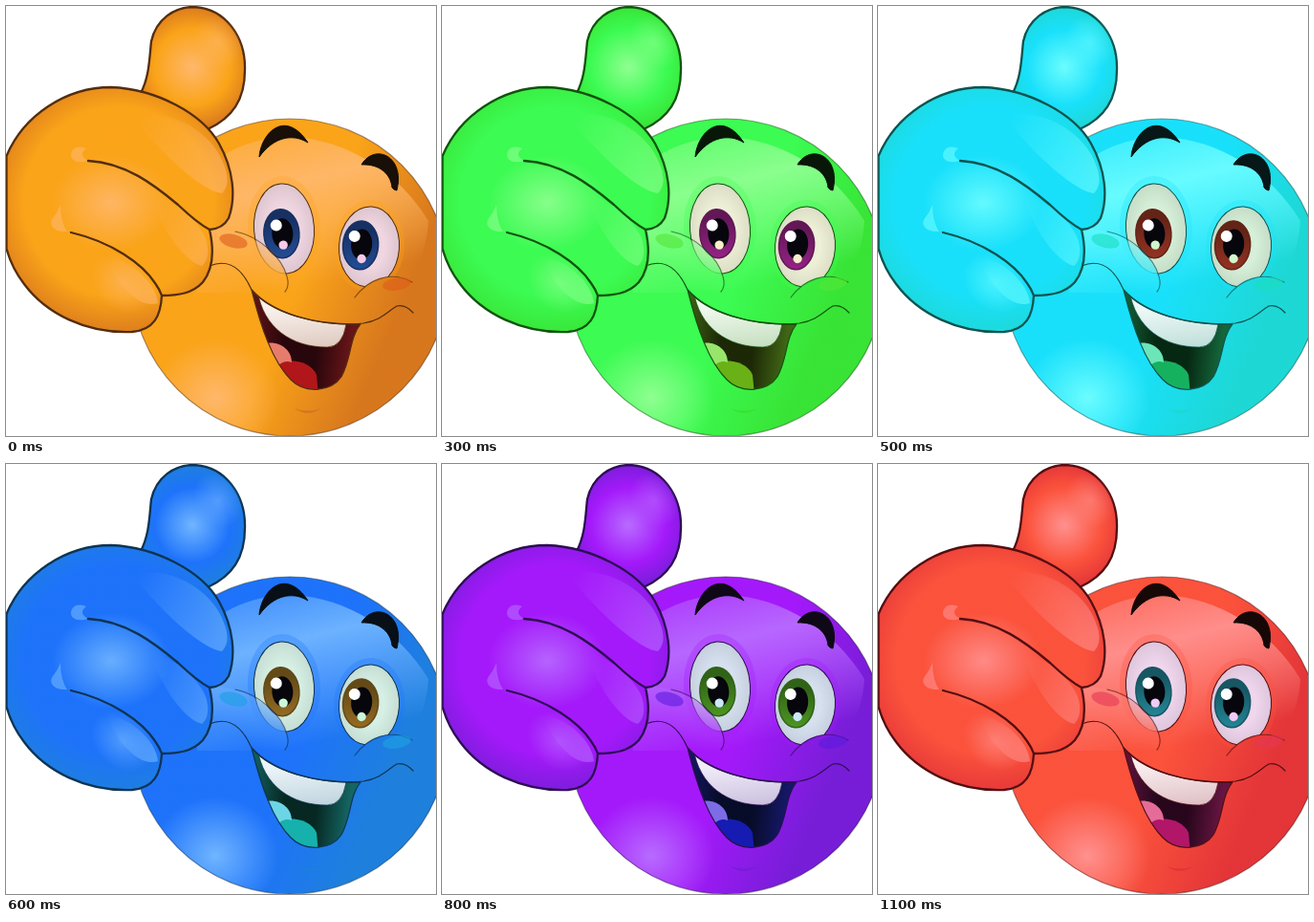
Write an HTML page that moves like this. It is 450 px wide and 450 px high and loops after 1.2 s.

```html
<!DOCTYPE html>
<html lang="en">
<head>
<meta charset="utf-8">
<title>Thumbs up</title>
<style>
  html, body { margin: 0; width: 100%; height: 100%; overflow: hidden; background: #fff; }
  svg { display: block; width: 100%; height: 100%; }
  .skin { stop-color: var(--skin); }
  .glow { stop-color: var(--glow); }
  .shade { stop-color: var(--shade); }
  .clear { stop-opacity: 0; }
  .line { fill: none; stroke: var(--line); stroke-width: 2.3; stroke-linecap: round; stroke-linejoin: round; }
  .thin { stroke-width: 1.2; }
  .white { fill: url(#eye); stroke: var(--line); stroke-width: 1; }
  .lid { fill: var(--skin); opacity: .3; }
  .iris { fill: url(#iris); stroke: var(--irisRim); stroke-width: 1.5; }
  .pupil { fill: #06060c; }
  .spark { fill: var(--spark); }
  .spot { fill: url(#spot); }
  .blush { fill: var(--blush); opacity: .6; }
  .brow { fill: var(--brow); stroke: var(--brow); stroke-linejoin: round; }
</style>
</head>
<body>
<svg id="stage" viewBox="0 0 450 450">
  <defs>
    <linearGradient id="face" gradientUnits="userSpaceOnUse" x1="245" y1="260" x2="425" y2="335">
      <stop class="skin" offset="0"/><stop class="skin" offset=".35"/><stop class="shade" offset=".9"/>
    </linearGradient>
    <linearGradient id="forehead" gradientUnits="userSpaceOnUse" x1="288" y1="140" x2="326" y2="292">
      <stop class="glow" offset="0" stop-opacity=".55"/><stop class="glow" offset=".3" stop-opacity=".95"/>
      <stop class="glow clear" offset="1"/>
    </linearGradient>
    <radialGradient id="hand" gradientUnits="userSpaceOnUse" cx="118" cy="205" r="150">
      <stop class="skin" offset="0"/><stop class="skin" offset=".66"/><stop class="shade" offset=".96"/>
    </radialGradient>
    <radialGradient id="thumb" gradientUnits="userSpaceOnUse" cx="195" cy="64" r="66">
      <stop class="glow" offset="0"/><stop class="skin" offset=".6"/><stop class="shade" offset="1"/>
    </radialGradient>
    <radialGradient id="spot">
      <stop class="glow" offset="0"/><stop class="glow clear" offset="1"/>
    </radialGradient>
    <linearGradient id="tip" x1="1" y1=".7" x2="0" y2=".2">
      <stop class="glow" offset="0"/><stop class="glow clear" offset="1"/>
    </linearGradient>
    <linearGradient id="cheek" x1=".5" y1="0" x2=".4" y2="1">
      <stop class="glow" offset="0" stop-opacity=".35"/><stop class="skin" offset=".7"/>
    </linearGradient>
    <radialGradient id="eye">
      <stop offset=".5" stop-color="var(--white)"/><stop offset="1" stop-color="var(--eyeEdge)"/>
    </radialGradient>
    <linearGradient id="iris" x1="0" y1="0" x2="0" y2="1">
      <stop offset=".2" stop-color="var(--irisRim)"/><stop offset="1" stop-color="var(--iris)"/>
    </linearGradient>
    <linearGradient id="maw" x1="0" y1="0" x2="1" y2=".1">
      <stop offset="0" stop-color="var(--mawSide)"/><stop offset=".35" stop-color="var(--maw)"/>
      <stop offset=".65" stop-color="var(--maw)"/><stop offset=".95" stop-color="var(--mawSide)"/>
    </linearGradient>
    <linearGradient id="teeth" x1=".3" y1="0" x2=".5" y2="1">
      <stop offset=".3" stop-color="var(--teeth)"/><stop offset="1" stop-color="var(--teethEdge)"/>
    </linearGradient>
    <clipPath id="inFace"><circle cx="297" cy="284" r="166"/></clipPath>
    <clipPath id="inMouth"><path id="mouth" d="M257 297C277 321 322 334 371 333C359 348 362 368 351 388C341 403 314 407 298 391C279 372 267 337 257 297Z"/></clipPath>
  </defs>

  <g id="head">
    <circle cx="297" cy="284" r="166" fill="url(#face)"/>
    <g clip-path="url(#inFace)">
      <path d="M195 182C225 150 262 137 300 137C355 140 410 172 442 225C440 262 425 285 400 300H200Z" fill="url(#forehead)"/>
      <ellipse class="spot" cx="219" cy="410" rx="66" ry="62"/>
    </g>
    <circle class="line thin" cx="297" cy="284" r="166" opacity=".5"/>

    <g id="leftEye" transform="rotate(-4 291 233)">
      <ellipse class="lid" cx="291" cy="232" rx="38" ry="54"/>
      <ellipse class="white" cx="291" cy="233" rx="31.5" ry="47"/>
      <ellipse class="iris" cx="288" cy="238" rx="18.5" ry="25.5"/>
      <ellipse class="pupil" cx="289" cy="238" rx="11" ry="16"/>
      <circle cx="283" cy="229" r="6" fill="#fff"/>
      <circle class="spark" cx="289" cy="250" r="4.7"/>
    </g>
    <g id="rightEye" transform="rotate(4 380 252)">
      <ellipse class="lid" cx="380" cy="251" rx="37" ry="48"/>
      <ellipse class="white" cx="380" cy="252" rx="31.5" ry="42"/>
      <ellipse class="iris" cx="371" cy="251" rx="18.5" ry="25.5"/>
      <ellipse class="pupil" cx="372" cy="250" rx="11" ry="16"/>
      <circle cx="364" cy="242" r="6" fill="#fff"/>
      <circle class="spark" cx="373" cy="265" r="4.7"/>
    </g>

    <path d="M208 234C245 229 284 253 294 283Q297 294 292 300L300 325L258 297C252 280 238 265 214 272Z" fill="url(#cheek)"/>
    <path d="M365 305C378 286 402 275 427 290C430 302 425 310 405 314L380 331L360 330Z" fill="url(#face)"/>
    <path class="line thin" d="M240 236C266 241 289 264 294 283Q297 293 292 299M365 305C378 287 402 276 425 289" opacity=".65"/>
    <ellipse class="blush" cx="238" cy="246" rx="15" ry="7" transform="rotate(14 238 246)"/>
    <ellipse class="blush" cx="409" cy="291" rx="15" ry="6.5" transform="rotate(-10 409 291)"/>

    <use href="#mouth" fill="url(#maw)"/>
    <g clip-path="url(#inMouth)">
      <path d="M280 376C293 367 319 371 325 386L327 407H285Z" fill="var(--tongue)"/>
      <path d="M269 354C283 349 299 358 299 373C291 370 286 375 281 380Z" fill="var(--tongueTop)"/>
      <path d="M263 297C269 337 299 357 336 357Q352 357 356 333L371 326Z" fill="url(#teeth)" stroke="var(--line)" stroke-width=".7"/>
    </g>
    <use href="#mouth" class="line thin"/>
    <path class="line thin" d="M213 272C235 263 248 277 257 297C283 325 333 336 374 332C393 329 400 319 409 314Q418 312 426 321"/>
    <path d="M302 421Q316 426 330 421Q316 431 302 421" fill="var(--shade)"/>

    <path class="brow" d="M265 158C267 133 292 107 316 143C300 133 280 137 265 158Z"/>
    <path class="brow" d="M372 166C386 143 418 157 409 193Q406 193 404 190C403 177 392 165 372 166Z"/>
  </g>

  <g id="fistAndThumb">
    <path class="line" style="fill:url(#thumb)" d="M141 91C150 74 150 55 152 37C157 14 176 1 196 1C230 2 251 33 250 67C250 98 237 117 211 129L180 145Z"/>
    <ellipse class="spot" cx="222" cy="38" rx="24" ry="30" transform="rotate(-30 222 38)" opacity=".6"/>
    <path class="line" style="fill:url(#hand)" d="M.5 157C18 115 62 85 110 85C157 87 205 112 223 144C238 171 241 200 233 222Q227 233 213 234C218 256 217 275 206 289C195 301 180 303 163 303C162 324 155 339 132 341C84 343 42 322 19 291Q6 274 .5 254Z"/>
    <ellipse class="spot" cx="110" cy="206" rx="62" ry="50" opacity=".9"/>
    <path d="M132 116C171 104 217 133 228 166Q236 186 226 196C208 194 170 163 132 116Z" fill="url(#tip)" opacity=".6"/>
    <path d="M150 197C178 202 205 228 210 247Q214 264 205 272C186 267 164 235 150 197Z" fill="url(#tip)" opacity=".5"/>
    <path d="M105 262C134 267 157 291 159 311C140 318 115 291 105 262Z" fill="url(#tip)" opacity=".6"/>
    <ellipse class="spot" cx="122" cy="290" rx="36" ry="28" transform="rotate(40 122 290)" opacity=".6"/>
    <path d="M86 162C73 166 65 160 69 152Q73 145 84 149Q75 156 86 162Z" fill="var(--glow)" opacity=".6"/>
    <path d="M64 236C50 237 44 229 49 222Q54 216 57 208Q57 226 64 236Z" fill="var(--glow)" opacity=".6"/>
    <path class="line" d="M86 162C125 164 155 187 180 208Q200 227 213 234M68 237C111 247 143 270 156 290Q161 297 163 303"/>
  </g>
</svg>
<script>
  const STEP_MS = 100, STEPS = 12;

  // hue, saturation, lightness
  const palette = {
    skin: [37, 96, 54], glow: [31, 100, 71], shade: [29, 76, 48], line: [27, 72, 19], brow: [30, 50, 6],
    white: [335, 45, 89], eyeEdge: [335, 26, 82], spark: [320, 70, 88],
    iris: [218, 62, 36], irisRim: [220, 62, 24],
    teeth: [20, 50, 95], teethEdge: [20, 32, 82],
    tongue: [358, 78, 39], tongueTop: [8, 70, 66], maw: [350, 72, 9], mawSide: [358, 66, 24],
    blush: [20, 78, 49]
  };
  const skinTones = ['skin', 'glow', 'shade', 'blush'];
  const lift = [0, 2, 4, 7, 0, 0, 1, 0, 0, 0, 2, 7];
  const stage = document.getElementById('stage');
  let shown = -1;

  function paint(step) {
    const turn = step * 360 / STEPS;
    for (const [name, [h, s, l]] of Object.entries(palette)) {
      const light = l + (skinTones.includes(name) ? lift[step] : 0);
      stage.style.setProperty('--' + name, `hsl(${(h + turn) % 360}, ${s}%, ${light}%)`);
    }
  }

  function tick() {
    const step = Math.floor(performance.now() / STEP_MS) % STEPS;
    if (step !== shown) paint(shown = step);
    requestAnimationFrame(tick);
  }
  tick();
</script>
</body>
</html>
```
